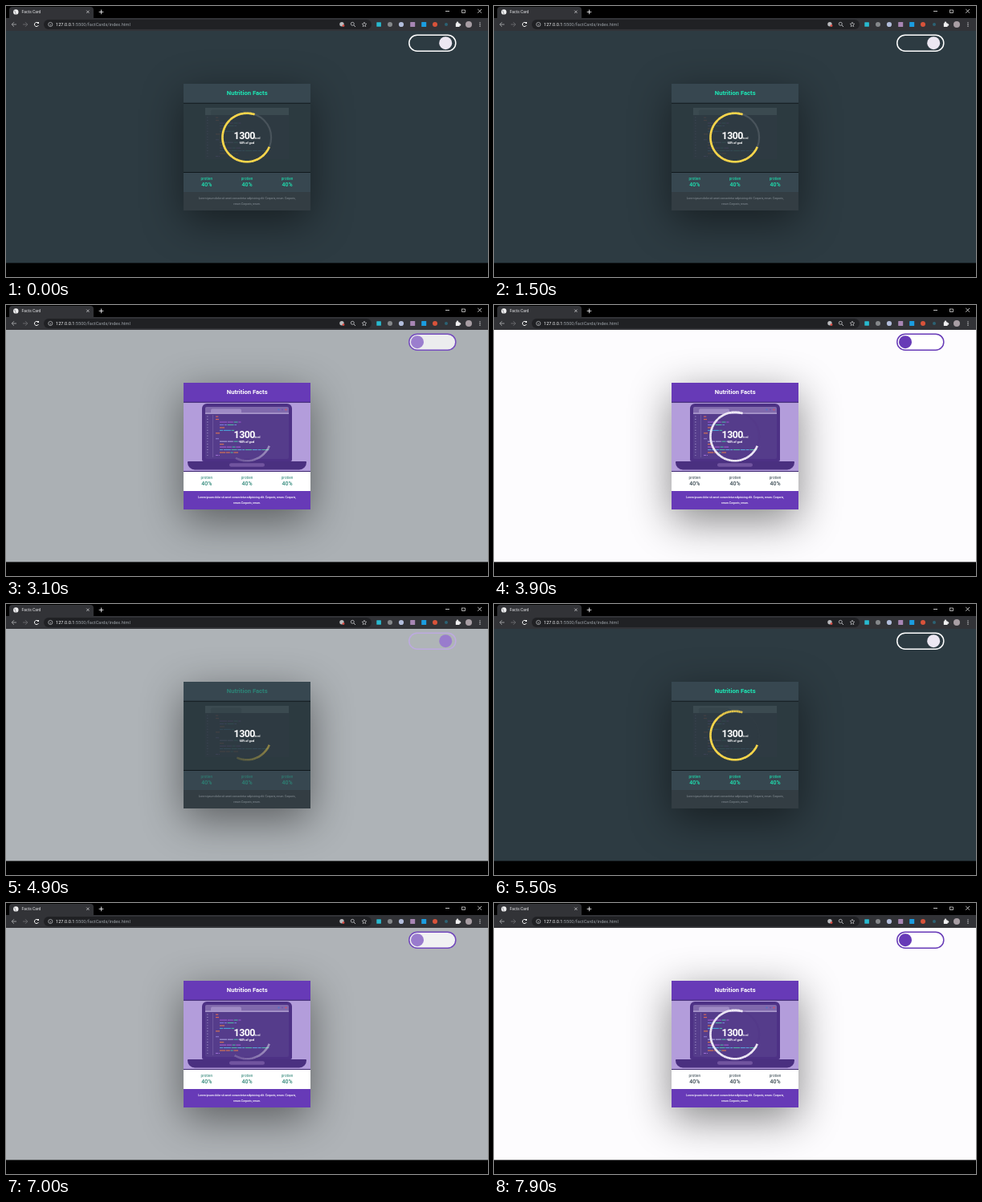
Write an HTML page with a canvas that moves like this. It is 600 px wide and 338 px high and loops after 8000 ms.

```html
<!DOCTYPE html>
<html lang="en">
<head>
<meta charset="utf-8">
<title>Facts Card</title>
<style>
html, body { margin: 0; width: 100%; height: 100%; overflow: hidden; background: #000; }
canvas { display: block; width: 600px; height: 338px; }
</style>
</head>
<body>
<canvas id="stage"></canvas>
<script>
const canvas = document.getElementById('stage');
const dpr = window.devicePixelRatio || 1;
canvas.width = Math.round(600 * dpr);
canvas.height = Math.round(338 * dpr);
const ctx = canvas.getContext('2d');

const LOOP = 8000;
const TAU = Math.PI * 2;
const SWITCHES = [[-2000, false], [2750, true], [4560, false], [6640, true]];

const PURPLE = [103, 58, 183], WHITE = [255, 255, 255], KNOB = [236, 231, 242];
const PAGE_DARK = [45, 59, 66], PAGE_LIGHT = [253, 252, 254];
const SLATE = [55, 71, 80], TEAL = [29, 233, 182];
const FONT = 'Roboto, "Open Sans", sans-serif';

// x, width and colour of each line of code on the laptop screen
const CODE = [
  [261, 4, '#e06a55'], [261, 4, '#e06a55'], [266, 27, '#9a55cf'], [266, 21, '#7a78e0'],
  [266, 6, '#e0794f'], [266, 18, '#4aa4d8'], [261, 5, '#e0794f'], null,
  [261, 4, '#8c7bd0'], [266, 27, '#a9a2dd'], [266, 6, '#e0794f'], [266, 26, '#ab5bd0'],
  [266, 62, '#5b9fd6'], [266, 23, '#e0794f'], [261, 5, '#9a6bd0']
];

const clamp = v => Math.max(0, Math.min(1, v));
const mix = (a, b, k) => a.map((v, i) => v + (b[i] - v) * k);
const rgb = (c, a = 1) => `rgba(${c.map(Math.round).join(',')},${a})`;

function ease(x) {
  if (x <= 0 || x >= 1) return clamp(x);
  let lo = 0, hi = 1;
  for (let i = 0; i < 20; i++) {
    const s = (lo + hi) / 2;
    const bx = 0.75 * s * (1 - s) + s * s * s;
    if (bx < x) lo = s; else hi = s;
  }
  const s = (lo + hi) / 2;
  return 0.3 * s * (1 - s) * (1 - s) + 3 * s * s * (1 - s) + s * s * s;
}

function rect(x, y, w, h, fill, r = 0) {
  ctx.fillStyle = fill;
  ctx.beginPath();
  ctx.roundRect(x, y, w, h, r);
  ctx.fill();
}

function disc(x, y, r, fill) {
  ctx.fillStyle = fill;
  ctx.beginPath();
  ctx.arc(x, y, r, 0, TAU);
  ctx.fill();
}

function arc(x, y, r, from, to, stroke, width) {
  ctx.strokeStyle = stroke;
  ctx.lineWidth = width;
  ctx.beginPath();
  ctx.arc(x, y, r, from, to);
  ctx.stroke();
}

function line(stroke, width, ...p) {
  ctx.strokeStyle = stroke;
  ctx.lineWidth = width;
  ctx.beginPath();
  for (let i = 0; i < p.length; i += 2) ctx.lineTo(p[i], p[i + 1]);
  ctx.stroke();
}

function text(str, x, y, size, fill, weight = 400, align = 'center', spacing = 0) {
  ctx.font = `${weight} ${size}px ${FONT}`;
  ctx.letterSpacing = spacing + 'px';
  ctx.textAlign = align;
  ctx.fillStyle = fill;
  ctx.fillText(str, x, y);
  return ctx.measureText(str).width;
}

function drawTabs() {
  rect(0, 0, 600, 15, '#000');
  rect(4, 1, 105, 15, '#323337', [4, 4, 0, 0]);
  disc(12.3, 7.4, 3.2, '#f1f1f2');
  line('#6d6e72', 0.6, 10, 6, 12, 7, 11.5, 9, 13, 10);
  text('Facts Card', 19.5, 9.3, 5, '#e4e5e8', 400, 'left');
  line('#d8d9dc', 0.7, 100.2, 5.6, 103.6, 9);
  line('#d8d9dc', 0.7, 103.6, 5.6, 100.2, 9);
  line('#e8e8ea', 0.9, 115.7, 7.4, 121.3, 7.4);
  line('#e8e8ea', 0.9, 118.5, 4.6, 118.5, 10.2);
  line('#eee', 0.8, 547, 6.5, 552, 6.5);
  line('#eee', 0.7, 567.5, 5, 571.5, 5, 571.5, 8.5, 567.5, 8.5, 567.5, 4.7);
  line('#eee', 0.8, 587.3, 4, 592, 8.7);
  line('#eee', 0.8, 592, 4, 587.3, 8.7);
}

function drawToolbar() {
  rect(0, 15, 600, 16, '#323337');
  rect(47, 17, 408, 12, '#202124', 6);
  line('#a3a5a8', 0.9, 13, 23, 7.2, 23);
  line('#a3a5a8', 0.9, 10, 20.2, 7.2, 23, 10, 25.8);
  line('#6b6d70', 0.9, 21, 23, 26.8, 23);
  line('#6b6d70', 0.9, 24, 20.2, 26.8, 23, 24, 25.8);
  arc(38, 23, 2.6, 0.4, 5.5, '#eee', 1);
  rect(39.1, 20.1, 1.9, 1.9, '#eee');
  arc(55.3, 23, 2.6, 0, TAU, '#c4c6c9', 0.7);
  line('#c4c6c9', 0.7, 55.3, 22.5, 55.3, 24.6);
  const w = text('127.0.0.1', 62, 25, 5.65, '#f0f1f3', 400, 'left');
  text(':5500/factCards/index.html', 62 + w, 25, 5.65, '#9aa0a6', 400, 'left');

  disc(418, 22.8, 2.7, '#b9babd');
  disc(420, 24.6, 1.4, '#dd4b43');
  arc(431.3, 22.3, 2, 0, TAU, '#c4c6c9', 0.8);
  line('#c4c6c9', 0.9, 432.8, 23.8, 435, 26);
  ctx.beginPath();
  for (let i = 0; i < 10; i++) {
    const a = i * Math.PI / 5 - Math.PI / 2, r = i % 2 ? 1.4 : 3;
    ctx.lineTo(446 + r * Math.cos(a), 23.2 + r * Math.sin(a));
  }
  ctx.closePath();
  ctx.lineWidth = 0.7;
  ctx.stroke();

  rect(461.3, 20.2, 5.6, 5.6, '#28b9cf', 0.6);
  disc(478, 23, 3, '#85888b');
  disc(492, 23, 3.1, '#b2bddb');
  rect(503.2, 20, 6, 6, '#a886b4', 0.6);
  rect(517.2, 20, 6, 6, '#1b9de0', 0.6);
  disc(534, 23, 3, '#d8533a');
  disc(548, 23, 2, '#2c6273');
  rect(559.8, 21.2, 4.8, 4.8, '#f0f0f1', 0.5);
  disc(562, 20.8, 1.2, '#f0f0f1');
  disc(565, 23.5, 1.2, '#f0f0f1');
  disc(576, 23, 4, '#a89ea4');
  for (let i = -1; i < 2; i++) disc(590, 23 + i * 2.2, 0.65, '#e2e3e5');
}

function drawToggle(light, p) {
  const k = clamp(p * 1.5);
  const edge = light ? mix(WHITE, PURPLE, k) : mix(PURPLE, WHITE, k);
  const fill = light ? mix(PAGE_DARK, WHITE, k) : mix(WHITE, PAGE_DARK, p);
  const knob = light ? mix(KNOB, PURPLE, p) : mix(PURPLE, KNOB, p);
  rect(501.8, 36.2, 58, 20, rgb(fill), 10);
  ctx.strokeStyle = rgb(edge);
  ctx.lineWidth = 1.5;
  ctx.stroke();
  disc(light ? 512 : 547.2, 46.2, 8, rgb(knob));
}

function drawCode(alpha) {
  ctx.globalAlpha = alpha;
  CODE.forEach((row, i) => {
    const y = 138.6 + i * 3.45;
    rect(250, y, 1.6, 0.9, '#9280bd');
    if (!row) return;
    const [x, w, fill] = row;
    let cx = x;
    for (let n = 0; cx < x + w; n++) {
      const part = Math.min(3 + (n * 5 + i * 3) % 7, x + w - cx);
      rect(cx, y, part, 1.1, n % 3 === 2 ? '#4fb3a5' : fill);
      cx += part + 0.8;
    }
  });
  ctx.globalAlpha = 1;
}

function drawLaptop(light) {
  if (!light) {
    rect(248, 127, 104, 9, '#3b4a50');
    rect(255, 129.5, 38, 6.5, '#36454b', [2, 2, 0, 0]);
    rect(248, 136, 104, 55, 'rgba(60,66,80,.1)');
    drawCode(0.13);
    return;
  }
  rect(244, 123, 112, 72, '#4d3185', [6, 6, 2, 2]);
  rect(248, 127, 104, 65, '#553c8b', 2);
  rect(248, 127, 104, 9, '#8069ac', [2, 2, 0, 0]);
  rect(255, 129.5, 38, 6.5, '#9f8bc5', [2, 2, 0, 0]);
  rect(248, 134.3, 104, 1.7, '#a795ca');
  ['#5076c8', '#7554b0', '#d34f68'].forEach((c, i) => disc(339.5 + i * 4.5, 130.5, 1.1, c));
  rect(257.2, 137, 0.5, 53, '#8671b2');
  drawCode(1);
  rect(226, 195, 148, 10.5, '#4a3080', [1, 1, 9, 9]);
  rect(278, 197.2, 44, 4.5, '#71549f', 2.2);
}

function drawRing(light, age) {
  const cx = 299.8, cy = 164, r = 30.3;
  const start = 0.4, sweep = 4.63, parts = 90;
  const colour = light ? [240, 235, 247] : [255, 218, 75];
  const track = light ? [78, 48, 130] : [80, 91, 98];
  const shown = clamp((age - 900) / 900) * (light ? 0.5 : 0.8);
  if (shown) arc(cx, cy, r, 0, TAU, rgb(track, shown), 2.2);

  const head = clamp((age - 50) / 850);
  for (let i = 0; i < parts * head; i++) {
    const u = i / parts;
    const alpha = clamp((age - 100 - 450 * u) / 500);
    const from = start + u * sweep;
    if (alpha) arc(cx, cy, r, from, from + sweep / parts + (alpha === 1 ? 0.01 : 0), rgb(colour, alpha), 2.6);
  }
}

function drawCard(light, p, age) {
  ctx.save();
  ctx.shadowColor = 'rgba(0,0,0,.48)';
  ctx.shadowBlur = 52 * dpr;
  ctx.shadowOffsetY = 14 * dpr;
  rect(221, 97, 158, 158, '#2c3a40');
  ctx.restore();

  const band = rgb(light ? PURPLE : SLATE);
  rect(221, 97, 158, 24.5, band);
  rect(221, 121.5, 158, 86, light ? '#b39ddb' : '#2c3a40');
  rect(221, 208, 158, 24, light ? '#fff' : band);
  rect(221, 232, 158, 23, light ? band : '#333d43');
  drawLaptop(light);
  rect(221, 120.8, 158, 1, light ? '#3d2670' : '#11191d');
  rect(221, 207, 158, 1, light ? '#3d2670' : '#11191d');
  drawRing(light, age);

  const title = light ? WHITE : mix(SLATE, TEAL, p);
  text('Nutrition Facts', 300.2, 111, 7.65, rgb(title), 700);
  text('1300', 283.6, 166.4, 12.3, '#fff', 700, 'left', -0.5);
  text('kcal', 309.6, 166.4, 3.9, '#fff', 500, 'left', -0.1);
  text('68% of goal', 300, 171.8, 3.8, '#fff', 700, 'center', -0.13);

  const stat = rgb(light ? mix(TEAL, SLATE, p) : mix(SLATE, TEAL, p));
  for (const x of [249.8, 300, 350]) {
    text('protien', x, 217.4, 4.7, stat);
    text('40%', x, 224.8, 7, stat, 500);
  }
  const note = light ? '#fff' : '#879097';
  const weight = light ? 500 : 400;
  text('Lorem ipsum dolor sit amet consectetur adipisicing elit. Corporis, rerum. Corporis,',
    300, 240.8, 3.6, note, weight, 'center', -0.12);
  text('rerum.Corporis, rerum.', 300, 248, 3.6, note, weight, 'center', -0.12);
}

function draw(t) {
  const [since, light] = SWITCHES.filter(s => s[0] <= t).pop();
  const age = t - since;
  const p = light ? ease(age / 1000) : clamp(age / 900);
  const page = light ? mix(PAGE_DARK, PAGE_LIGHT, p) : mix(PAGE_LIGHT, PAGE_DARK, p);

  ctx.setTransform(dpr, 0, 0, dpr, 0, 0);
  rect(0, 31, 600, 290, rgb(page));
  drawCard(light, p, age);
  drawToggle(light, p);
  rect(0, 320.5, 600, 17.5, '#000');
  drawTabs();
  drawToolbar();
}

const began = performance.now();
function tick() {
  draw((performance.now() - began) % LOOP);
  requestAnimationFrame(tick);
}
tick();
</script>
</body>
</html>
```
